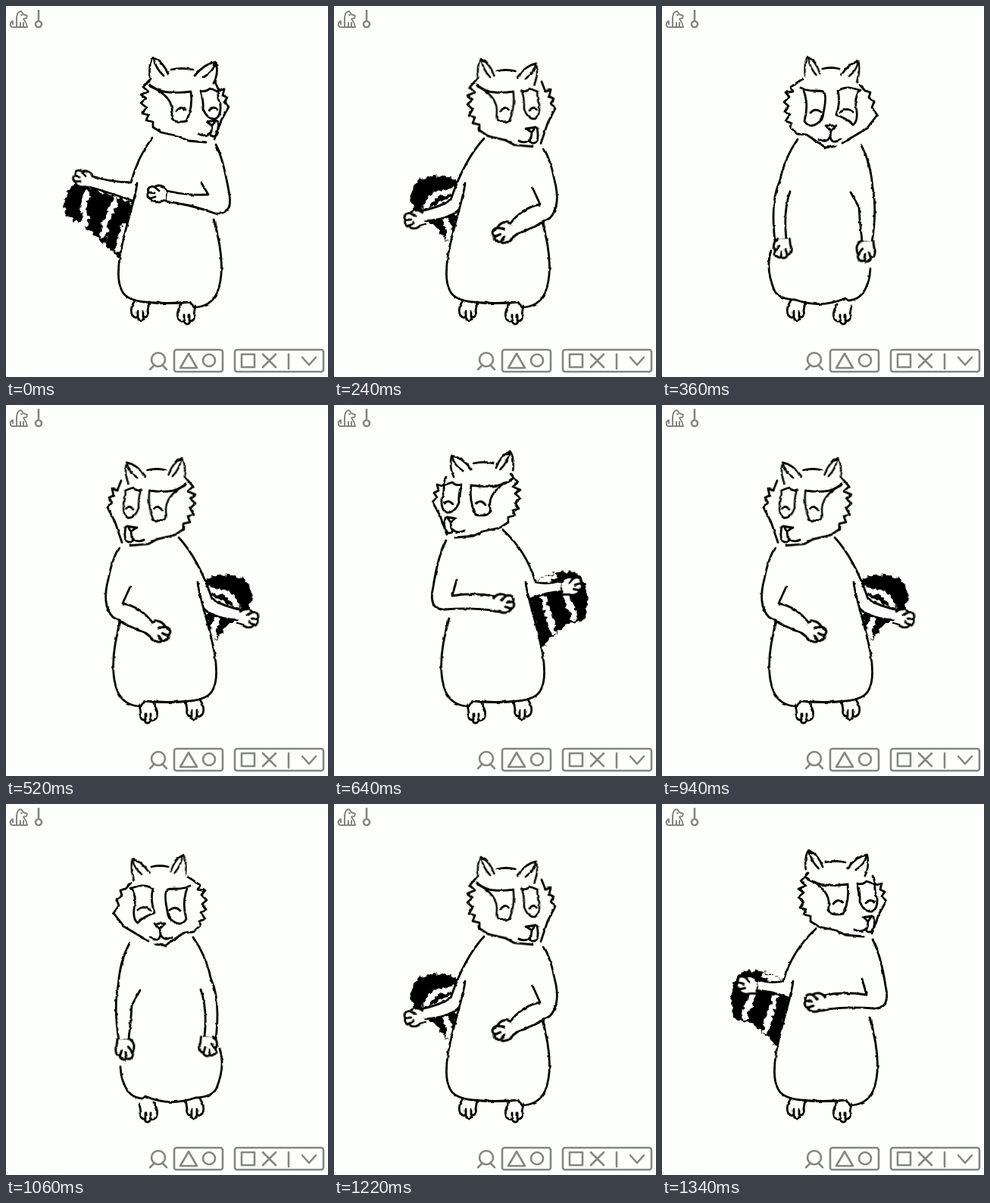
An HTML page without scripts that plays this animation: 425 by 490 pixels, repeating every 1400 ms.

```html
<!DOCTYPE html>
<html lang="en">
<head>
<meta charset="utf-8">
<title>Dancing raccoon</title>
<style>
html, body { margin: 0; height: 100%; overflow: hidden; background: #fdfffc; }
svg { display: block; width: 425px; height: 490px; }
path, circle, rect { fill: none; stroke-linecap: round; stroke-linejoin: round; }
.ink { stroke: #000; stroke-width: 2.8; }
.sign { stroke: #858585; stroke-width: 2.6; }
.solid { fill: #fdfffc; }
#tail { fill: #000; }
#stripes { stroke: #fdfffc; stroke-width: 8; }

/* Each part swings through poses a to d and back; steps(2) adds one in-between. */
.part { animation: swing .7s steps(2) infinite; }
@keyframes swing {
  0%, 17.12%, to { d: var(--a); transform: var(--ta, none); }
  17.13%, 91.41%, 99.99% { d: var(--b, var(--a)); transform: var(--tb, none); }
  34.26%, 74.26% { d: var(--c, var(--a)); transform: var(--tc, none); }
  51.41%, 57.12% { d: var(--d, var(--a)); transform: var(--td, none); }
}
#dancer { animation: flip 1.4s step-end infinite; }
@keyframes flip {
  0%, 79.27%, to { transform: none; }
  29.27% { transform: translateX(426px) scaleX(-1); }
}

#tail, #stripes { --td: translate(150px, 270px) scale(.3); }
#tail {
  --a: path("M92 234Q125 246 165 262L150 332L116 299L80 276Q72 252 92 234");
  --b: path("M104 224Q135 215 170 240L152 319L122 290L97 282Q84 250 104 224");
  --c: path("M110 232Q140 218 162 232L158 317L132 288L110 272Q94 250 110 232");
  --d: var(--c);
}
#stripes {
  --a: path("M106 247L102 268L106 280L101 290M144 257L136 276L130 290L129 303M157 290L153 306L149 321");
  --b: path("M119 252L115 264L111 272L109 281M150 254L146 268L140 286L137 299M136 227L148 231L160 237");
  --c: path("M158 244L136 248L124 260L119 271M146 280L150 290L152 300L154 310M155 258L140 262L131 269");
  --d: var(--c);
}
#far-arm {
  --a: path("M193 174Q174 199 165 233Q138 233 111 224L107 238Q125 243 167 257");
  --b: path("M203 165Q172 193 160 234Q143 238 124 231L126 246Q148 248 170 257");
  --c: path("M198 175Q172 203 154 256Q140 266 113 271L118 284Q164 282 171 258");
  --d: path("M179 176Q162 200 155 232Q143 258 149 310L164 308Q160 270 169 245");
}
#near-arm {
  --a: path("M277 183Q287 202 295 250Q299 276 276 274Q244 262 210 258L212 244Q240 251 267 249L258 234");
  --b: path("M278 179Q289 200 295 240Q302 271 280 270Q244 267 212 272L212 253Q240 247 270 252L264 231");
  --c: path("M277 188Q287 207 291 230Q300 264 285 280Q264 293 237 303L232 288Q249 266 272 262L262 240");
  --d: path("M263 184Q276 208 278 240Q284 270 277 312Q272 313 264 310L264 310Q261 285 260 266L249 246");
}
#belly {
  --a: path("M173 234C171 262 136 345 153 376Q158 388 183 391Q212 394 243 391L247 398Q270 398 279 378Q292 344 274 282");
  --d: path("M144 323C138 340 142 360 148 375Q153 387 176 388Q210 400 242 386L246 389Q263 388 270 370Q274 362 275 347");
}
#far-hand {
  --ta: translate(101px, 228px) rotate(14deg);
  --tb: translate(112px, 239px) rotate(6deg) scale(1.1);
  --tc: translate(106px, 282px) rotate(-14deg) scale(1.05);
  --td: translate(159px, 320px) rotate(-90deg) scale(1.05);
}
#near-hand {
  --ta: translate(199px, 248px);
  --tb: translate(202px, 262px) rotate(0deg) scale(1.12);
  --tc: translate(224px, 300px) rotate(-32deg) scale(1.15);
  --td: translate(269px, 324px) rotate(-90deg) scale(1.1);
}
#ears {
  --a: path("M190 93Q188 76 194 68Q208 74 214 90M195 70Q198 83 208 92M218 84Q232 81 246 84M249 92Q262 76 277 74Q281 88 274 102M276 76Q274 86 261 94");
  --tb: translate(13px, -7px) scaleX(.93);
  --tc: translate(23px, 2px) scaleX(.88);
  --td: translate(35px, -1px) scaleX(.81);
}
#cheeks {
  --a: path("M191 96L181 107 188 113 178 117 185 122 178 128 185 134 180 142 188 144 185 151 194 153 194 160 205 167 228 172 240 178 264 180M276 100L281 112 288 110 286 118 292 121 288 127 294 133 284 151 275 176");
  --d: path("M186 96L170 107 173 113 163 114 168 120 161 127 167 132 162 139 169 143 163 152 171 155 170 161 179 169 191 170 216 187 229 185M261 104L268 112 275 114 273 121 280 126 277 134 284 144 270 162 238 181");
  --tb: translate(2px, -5px);
  --tc: translate(-2px, -7px) scaleY(1.07);
}
#mask {
  --a: path("M189 104Q203 114 216 114Q230 115 244 113Q247 134 238 152Q216 156 219 142Q222 120 190 106M257 112Q264 114 269 109L280 113Q279 122 283 130Q284 146 276 149Q266 150 260 136Q261 126 257 112M225 139Q231 131 237 137M268 138Q274 131 279 137");
  --d: path("M183 108Q192 112 200 112Q210 112 213 113Q219 118 211 150Q196 165 188 152Q194 130 187 112M232 112Q240 107 248 108L262 111Q254 118 256 132Q260 152 252 157Q244 148 230 144Q236 126 232 112M196 141Q202 134 210 140M236 140Q244 133 252 140");
  --tb: translate(1px, -7px);
  --tc: translate(22px, 0) scaleX(.88);
}
#muzzle {
  --a: path("M272 158L265 153L277 151ZL271 166Q264 174 254 169M279 152Q283 174 272 172Q268 171 271 166");
  --d: path("M223 165L216 158L230 158ZL222 172Q218 182 207 176M236 176Q230 180 226 179Q223 178 222 172");
  --tb: translate(0, -3px);
  --tc: translate(-11px, 9px);
}
</style>
</head>
<body>
<svg viewBox="0 0 425 490">
  <defs>
    <filter id="rough" filterUnits="userSpaceOnUse" width="426" height="490" color-interpolation-filters="sRGB">
      <feTurbulence type="fractalNoise" baseFrequency=".16" seed="4"/>
      <feDisplacementMap in="SourceGraphic" scale="3" xChannelSelector="R" yChannelSelector="G"/>
    </filter>
    <filter id="shaggy" filterUnits="userSpaceOnUse" width="426" height="490" color-interpolation-filters="sRGB">
      <feTurbulence type="fractalNoise" baseFrequency=".18" seed="7"/>
      <feDisplacementMap in="SourceGraphic" scale="10" xChannelSelector="R" yChannelSelector="G"/>
    </filter>
    <path id="hand" class="solid" d="M12-6C8-12 1-12-3-9C-9-11-13-7-11-2C-14 2-11 6-8 6C-8 11 0 12 4 10L12 9M-11-2L-4-1M-8 6L-2 4M-3-9L3-4"/>
    <path id="foot" d="M170 389C165 397 164 404 167 409Q172 414 174 409C173 415 181 418 182 411Q189 411 187 402L189 391M174 403V410M181 403V411"/>
  </defs>

  <g id="dancer">
    <g class="ink" filter="url(#rough)">
      <g filter="url(#shaggy)">
        <path id="tail" class="part"/>
        <path id="stripes" class="part"/>
      </g>
      <path id="far-arm" class="part solid"/>
      <path id="belly" class="part solid"/>
      <g id="far-hand" class="part"><use href="#hand"/></g>
      <path id="near-arm" class="part solid"/>
      <g id="near-hand" class="part"><use href="#hand"/></g>
      <use href="#foot"/>
      <use href="#foot" x="61" y="5"/>
      <path id="ears" class="part"/>
      <path id="cheeks" class="part"/>
      <path id="mask" class="part"/>
      <path id="muzzle" class="part"/>
    </g>
  </g>

  <g class="sign">
    <path stroke-width="2" d="M14 28V15Q15 7 20 7L23 11 28 13 27 16 23 17Q27 22 28 28H10C4 28 5 21 9 20V24M19 28V22M23 28V22M20 12H21"/>
    <path d="M43 6V18"/>
    <circle cx="43" cy="24" r="4"/>
    <circle cx="201" cy="467" r="9"/>
    <path d="M196 474 190 480M206 474 212 480"/>
    <rect x="222" y="454" width="64" height="29" rx="3"/>
    <path d="M241 459 252 478H230Z"/>
    <circle cx="268" cy="468" r="8"/>
    <rect x="302" y="454" width="117" height="29" rx="3"/>
    <path d="M311 460H328V477H311ZM339 460 356 477M356 460 339 477M373 460V479M391 464 400 474 409 464"/>
  </g>
</svg>
</body>
</html>
```
